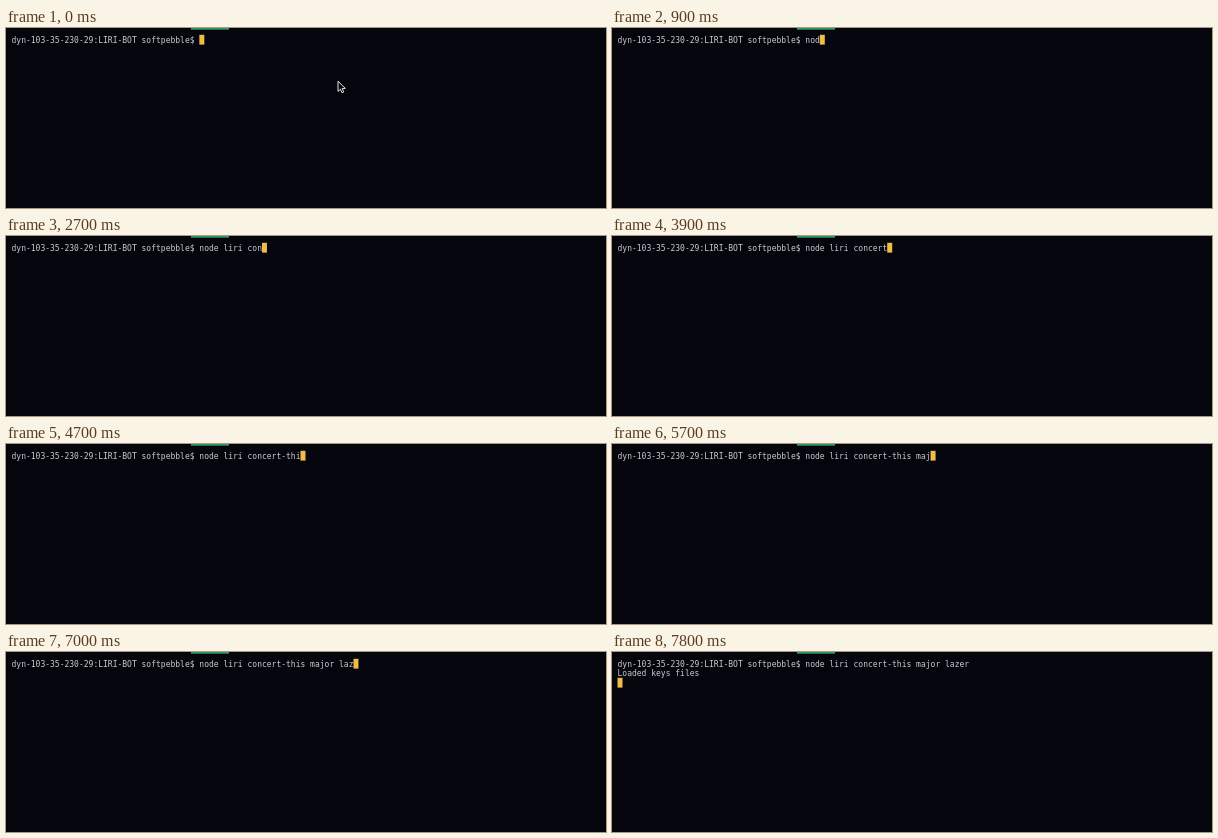
An HTML page with a canvas that plays this animation: 600 by 180 pixels, repeating every 8000 ms.

```html
<!DOCTYPE html>
<html lang="en">
<head>
<meta charset="utf-8">
<title>Terminal</title>
<style>
html, body { margin: 0; width: 100%; height: 100%; overflow: hidden; background: #05060d; }
canvas { display: block; }
</style>
</head>
<body>
<canvas id="stage" width="600" height="180"></canvas>
<script>
const ctx = document.getElementById('stage').getContext('2d');
const LOOP = 8000, STEP = 100;
const LEFT = 5.5, TOP = 6.8, ROW = 9.5, BASE = 7.7;
const PROMPT = 'dyn-103-35-230-29:LIRI-BOT softpebble$ ';
const HIDE_POINTER = 500, ENTER = 7700, REPLY = 7800;

// each burst is typed at an even pace from its first to its last key
const BURSTS = [
  { text: 'node ', from: 600, to: 1200 },
  { text: 'liri ', from: 1700, to: 2400 },
  { text: 'con', from: 2600, to: 2700 },
  { text: 'cert', from: 3300, to: 3900 },
  { text: '-this ', from: 4200, to: 5000 },
  { text: 'maj', from: 5400, to: 5700 },
  { text: 'or', from: 5900, to: 6000 },
  { text: ' l', from: 6400, to: 6500 },
  { text: 'azer', from: 6700, to: 7400 }
];

ctx.font = '8px "DejaVu Sans Mono", monospace';
const CELL = ctx.measureText('0').width;

function typedAt(t) {
  return BURSTS.map(({ text, from, to }) => {
    const gap = (to - from) / (text.length - 1);
    return [...text].filter((_, i) => Math.round((from + i * gap) / STEP) * STEP <= t).join('');
  }).join('');
}

function rect(color, x, y, w, h) {
  ctx.fillStyle = color;
  ctx.fillRect(x, y, w, h);
}

function line(text, row) {
  ctx.fillStyle = '#cbccce';
  ctx.fillText(text, LEFT, TOP + BASE + row * ROW);
}

function cursor(col, row) {
  rect('#f4ba48', LEFT + col * CELL, TOP + row * ROW, CELL + 0.18, 9.8);
}

function pointer(x, y) {
  const shape = new Path2D(`M${x} ${y}v10.2l2.4-2.2 1.6 3.6 1.7-.8-1.5-3.4 3.1-.2z`);
  ctx.fillStyle = '#08090f';
  ctx.fill(shape);
  ctx.strokeStyle = '#e4e5e8';
  ctx.stroke(shape);
}

function draw(t) {
  rect('#05060d', 0, 0, 600, 180);
  rect('#2f9a6c', 185, 0, 38, 1.7);

  const typed = typedAt(t);
  line(PROMPT + typed, 0);

  if (t >= REPLY) {
    line('Loaded keys files', 1);
    cursor(0, 2);
  } else if (t >= ENTER) {
    cursor(0, 1);
  } else {
    cursor(PROMPT.length + typed.length, 0);
  }
  if (t < HIDE_POINTER) pointer(332, 53.2);
}

const start = performance.now();
function tick() {
  draw((performance.now() - start) % LOOP);
  requestAnimationFrame(tick);
}
tick();
</script>
</body>
</html>
```
